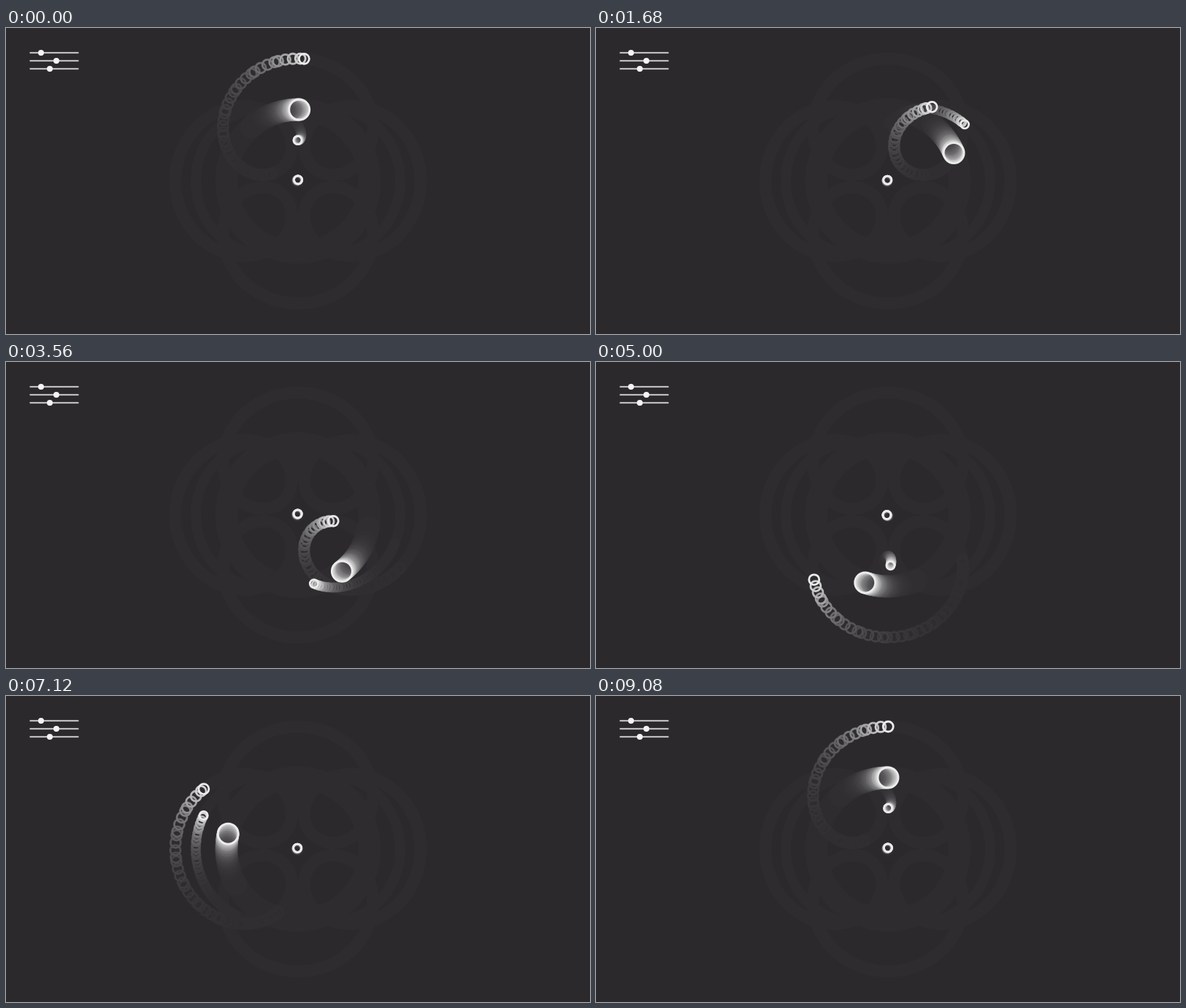
Write an HTML page with a canvas that moves like this. It is 800 by 420 pixels and loops after 9.12 s.

```html
<!DOCTYPE html>
<html lang="en">
<head>
<meta charset="utf-8">
<title>Orbits</title>
<style>
  html, body { margin: 0; width: 800px; height: 420px; overflow: hidden; background: #2b292c; }
  canvas { display: block; }
</style>
</head>
<body>
<canvas id="stage" width="800" height="420"></canvas>
<script>
const W = 800, H = 420, LOOP = 9120, FRAME = 40;
const CX = 400, CY = 210, ORBIT = 98;
const BG = '#2b292c', GHOST = '#2e2c2f', RING = '#ececec';
const LINE = 2.8, FADE = 0.15, TRAIL = 36;

// Uneven redraw rhythm: three long steps, then a short one.
const CYCLE = 116.8, STEP = 33.4, FIRST = 27, LEAD = 41;

const ctx = document.getElementById('stage').getContext('2d');
const makeLayer = () => Object.assign(document.createElement('canvas'), { width: W, height: H });
const trail = makeLayer(), tc = trail.getContext('2d');
const backdrop = makeLayer();

// Point on a circle, angle clockwise from the top.
const around = ([x, y], r, a) => [x + r * Math.sin(a), y - r * Math.cos(a)];
const planet = a => around([CX, CY], ORBIT, a);

const bodies = [
  { r: 5.6, at: a => around([CX, CY], 1.5, 5 * a) },
  { r: 14, at: planet },
  { r: 7, at: a => around(planet(a), 70, 5 * a) },
  { r: 5.6, at: a => around(planet(a), 42, 3 * a + Math.PI) }
];

function drawBackdrop() {
  const c = backdrop.getContext('2d');
  c.fillStyle = BG;
  c.fillRect(0, 0, W, H);

  // Faint marks left along every path
  c.strokeStyle = GHOST;
  c.lineJoin = 'round';
  for (const { r, at } of bodies) {
    c.lineWidth = 2 * r + LINE;
    c.beginPath();
    for (let i = 0; i < 720; i++) c.lineTo(...at(i * Math.PI / 360));
    c.closePath();
    c.stroke();
  }

  // Slider icon
  [[48, 34], [69, 45], [60, 56]].forEach(([x, y]) => {
    c.fillStyle = '#bebdbf';
    c.fillRect(32.5, y - 1.1, 67, 2.2);
    c.fillStyle = '#f4f4f4';
    c.beginPath();
    c.arc(x, y, 4, 0, 2 * Math.PI);
    c.fill();
  });
}

const tickTime = n => {
  const cycle = Math.floor(n / 4);
  return FIRST + cycle * CYCLE + (n - 4 * cycle) * STEP;
};

function lastTick(t) {
  const d = t + LEAD - FIRST, cycle = Math.floor(d / CYCLE);
  return 4 * cycle + Math.min(3, Math.floor((d - cycle * CYCLE) / STEP));
}

function drawTrail(t) {
  tc.clearRect(0, 0, W, H);
  tc.strokeStyle = RING;
  tc.lineWidth = LINE;
  const last = lastTick(t);
  for (let n = last - TRAIL; n <= last; n++) {
    tc.globalCompositeOperation = 'destination-out';
    tc.fillStyle = `rgba(0,0,0,${FADE})`;
    tc.fillRect(210, 20, 380, 380);
    tc.globalCompositeOperation = 'source-over';
    const a = tickTime(n) / LOOP * 2 * Math.PI;
    for (const { r, at } of bodies) {
      tc.beginPath();
      tc.arc(...at(a), r, 0, 2 * Math.PI);
      tc.stroke();
    }
  }
}

let start = null, shown = -1;
function tick() {
  const now = performance.now();
  if (start === null) start = now;
  const t = Math.floor((now - start) % LOOP / FRAME) * FRAME;
  if (t !== shown) {
    shown = t;
    drawTrail(t);
    ctx.drawImage(backdrop, 0, 0);
    ctx.drawImage(trail, 0, 0);
  }
  requestAnimationFrame(tick);
}

drawBackdrop();
tick();
</script>
</body>
</html>
```
